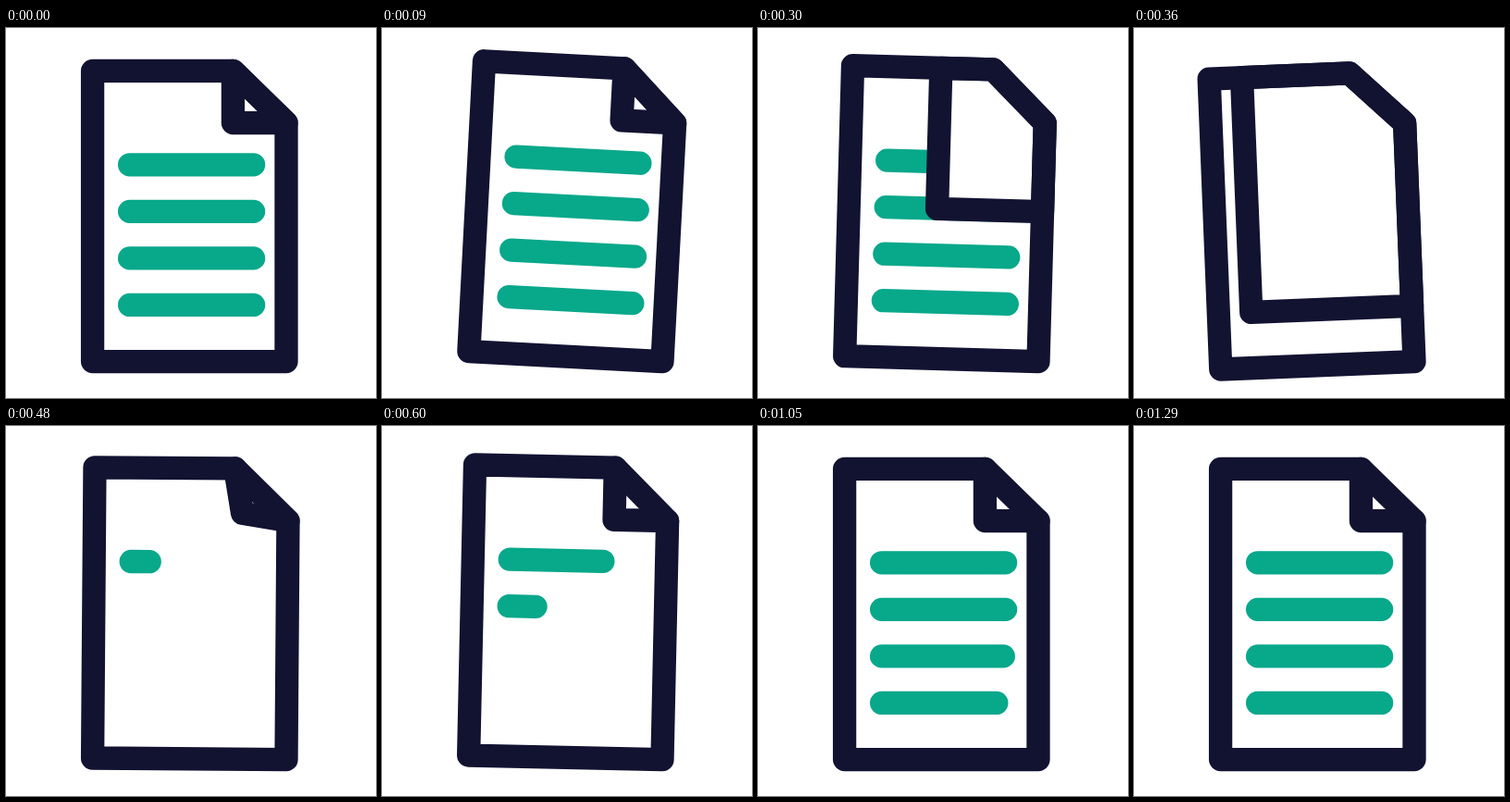
An HTML page for the animation above (1.83 s loop, 400 px wide and 400 px high).

```html
<!DOCTYPE html>
<html lang="en">
<head>
<meta charset="utf-8">
<title>Document</title>
<style>
  html, body { margin: 0; width: 100%; height: 100%; overflow: hidden; background: #fff; }
  svg { display: block; width: 100vw; height: 100vh; }
  path { stroke-width: 25.3; stroke-linecap: round; stroke-linejoin: round; }
  .ink { stroke: #121331; fill: none; }
  .paper { fill: #fff; }
  .text path { stroke: #08a88a; }
</style>
</head>
<body>
<svg viewBox="0 0 400 400">
  <g id="page">
    <g class="text">
      <path/><path/><path/><path/>
    </g>
    <path id="flap" class="ink paper"/>
    <path id="fold" class="ink"/>
    <path class="ink" d="M93.6 46.4H245.4L303 102.6V360.6H93.6Z"/>
  </g>
</svg>
<script>
  const LOOP = 1830;
  const TURN_START = 210, TURN_END = 430;
  const page = document.getElementById('page');
  const flap = document.getElementById('flap');
  const fold = document.getElementById('fold');
  const lines = document.querySelectorAll('.text path');

  const clamp = x => Math.min(1, Math.max(0, x));
  const mix = (a, b, p) => a + (b - a) * p;
  const smooth = p => p * p * (3 - 2 * p);
  const span = (t, from, to) => clamp((t - from) / (to - from));

  // Swing around the bottom right corner, in degrees
  const swing = [[0, 0], [200, 7], [392, -3], [535, 2.05]];

  function angle(t) {
    for (let i = 1; i < swing.length; i++) {
      const [t0, a0] = swing[i - 1], [t1, a1] = swing[i];
      if (t < t1) return mix(a0, a1, smooth(span(t, t0, t1)));
    }
    const a = 2.05 * Math.exp(-(t - 535) / 133);
    return a * (1 - smooth(span(t, 850, 1080)));
  }

  function written(t, i) {
    if (t < TURN_END) return 1;
    const age = t - 465 - 112 * i;
    return age <= 0 ? 0 : Math.min(1, 1.01 * (1 - Math.exp(-age / 100)));
  }

  function draw(t) {
    page.setAttribute('transform', `rotate(${angle(t)} 303 360.6)`);

    lines.forEach((line, i) => {
      const p = written(t, i);
      line.style.display = p ? '' : 'none';
      line.setAttribute('d', `M133.6 ${147.8 + 50.55 * i}h${134 * p}`);
    });

    // The folded corner sweeps over the sheet and becomes the next one
    const turn = smooth(span(t, TURN_START, TURN_END));
    const x = mix(245.4, 93.6, turn), y = mix(102.6, 360.6, turn);
    flap.style.display = t < TURN_END ? '' : 'none';
    flap.setAttribute('d', `M${x} 46.4V${y}H303V102.6L245.4 46.4Z`);

    const grow = smooth(span(t, 390, 530));
    fold.style.display = grow ? '' : 'none';
    fold.setAttribute('d',
      `M245.4 46.4L${mix(274.2, 245.4, grow)} ${mix(74.5, 102.6, grow)}L303 102.6`);
  }

  const start = performance.now();
  function tick() {
    draw((performance.now() - start) % LOOP);
    requestAnimationFrame(tick);
  }
  tick();
</script>
</body>
</html>
```
